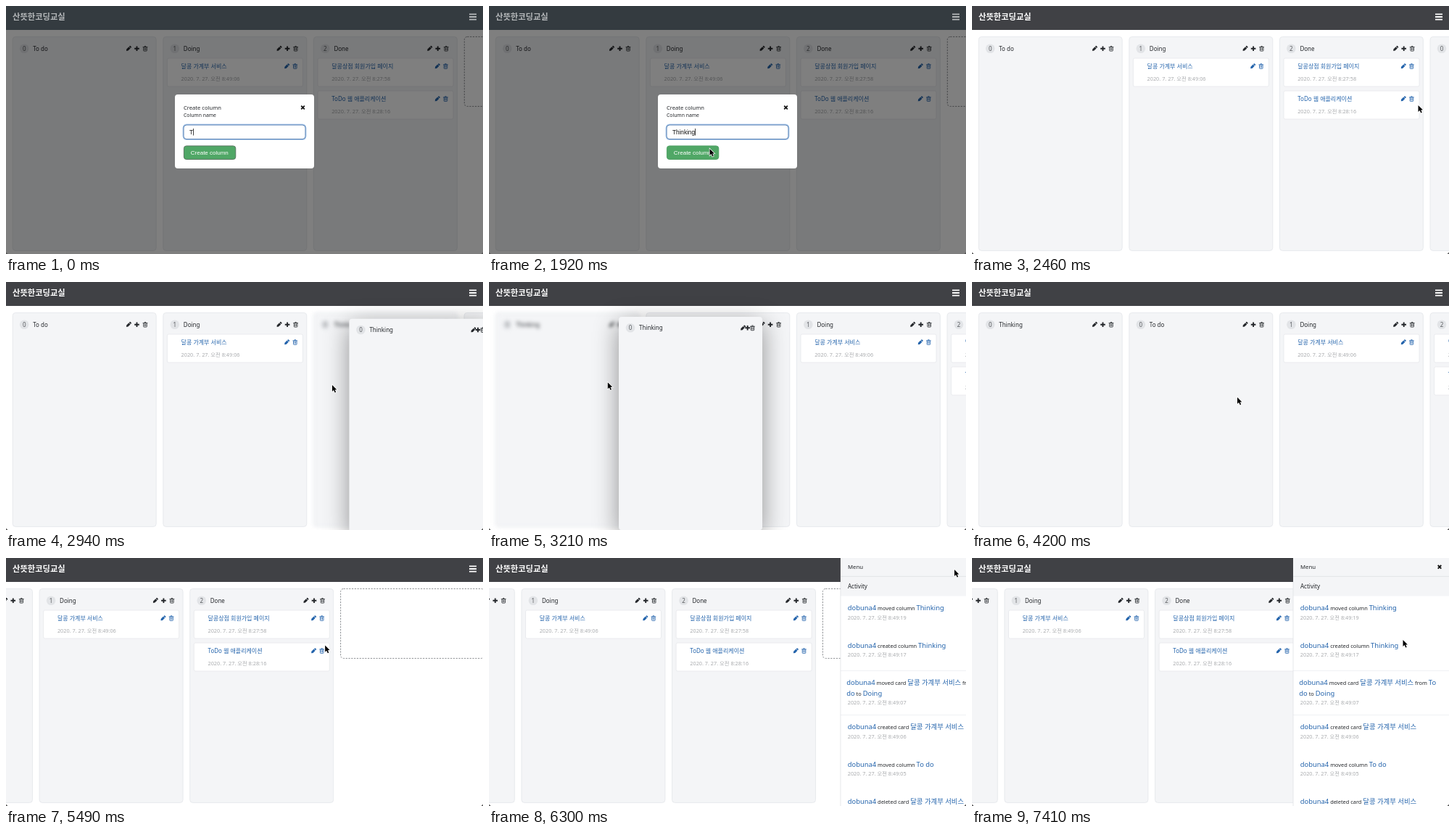
Recreate the animation shown at these times as an HTML page with a canvas. Size 658x342 px, loop 7.62 s.

```html
<!DOCTYPE html>
<html lang="ko">
<head>
<meta charset="utf-8">
<title>Board</title>
<style>
html, body { margin: 0; width: 100%; height: 100%; overflow: hidden; background: #fff; }
canvas { display: block; width: 658px; height: 342px; }
</style>
</head>
<body>
<canvas id="stage"></canvas>
<script>
const W = 658, H = 342, LOOP = 7620;
const PITCH = 207.6, LEFT = 9.2, TOP = 42, COL_W = 198, COL_H = 295;
const SANS = '"Noto Sans", "Noto Sans CJK KR", "Noto Sans CJK", sans-serif';
const ARIAL = '"Liberation Sans", sans-serif';
const BLUE = '#2464ac', INK = '#24272b', FAINT = '#a9abae', PANEL = '#f4f5f7';
const USER = 'dobuna4', BUDGET = '달콩 가계부 서비스';

const canvas = document.getElementById('stage');
const ctx = canvas.getContext('2d');
const dpr = window.devicePixelRatio || 1;
canvas.width = W * dpr;
canvas.height = H * dpr;

const COLUMNS = {
  todo: { name: 'To do', cards: [] },
  doing: { name: 'Doing', cards: [[BUDGET, '8:49:06']] },
  done: { name: 'Done', cards: [['달콩상점 회원가입 페이지', '8:27:58'], ['ToDo 웹 애플리케이션', '8:28:16']] },
  thinking: { name: 'Thinking', cards: [] }
};

// Runs alternate between highlighted and plain text.
const ACTIVITY = [
  { y: 69, lines: [[USER, ' moved column ', 'Thinking']], time: '8:49:19' },
  { y: 120.5, lines: [[USER, ' created column ', 'Thinking']], time: '8:49:17' },
  { y: 172, dx: -1.5, lines: [[USER, ' moved card ', BUDGET, ' from ', 'To'], ['do', ' to ', 'Doing']], time: '8:49:07' },
  { y: 233, lines: [[USER, ' created card ', BUDGET]], time: '8:49:06' },
  { y: 284.5, lines: [[USER, ' moved column ', 'To do']], time: '8:49:05' },
  { y: 336, lines: [[USER, ' deleted card ', BUDGET]], time: '8:49:03' }
];

const KEY_TIMES = [0, 60, 120, 180, 330, 390, 480, 570];
const POINTER_SHOWN = 660, MODAL_CLOSE = 1950, COLUMN_ADDED = 1980;
const DRAG_START = 2700, DRAG_END = 3690, DRAG_LAG = 26;
const SCROLL_START = 4710, SCROLL_TIME = 840, SCROLL_MAX = 379.5;
const MENU_OPEN = 6100, MENU_TIME = 400, MENU_W = 215;

// time, x, y of the pointer tip
const POINTER = [
  [660, 596, 150], [1020, 420, 184], [1350, 420, 184], [1860, 304.5, 197], [2130, 304.5, 197],
  [2520, 636, 133], [2670, 636, 133], [2800, 588, 139], [2940, 451, 142], [3080, 290, 141],
  [3210, 164.5, 138.5], [3330, 98, 134], [3480, 73, 133], [3870, 73, 133], [4200, 366, 159],
  [5280, 366, 159], [5900, 642, 16], [6420, 642, 16], [7020, 600, 101], [7410, 594.5, 113]
];

const clamp = v => Math.max(0, Math.min(1, v));

// cubic-bezier(x1, y1, x2, y2)
function bezier(p, x1, y1, x2, y2) {
  const at = (s, a, b) => 3 * a * s * (1 - s) ** 2 + 3 * b * s * s * (1 - s) + s ** 3;
  let lo = 0, hi = 1;
  for (let i = 0; i < 20; i++) {
    const mid = (lo + hi) / 2;
    if (at(mid, x1, x2) < p) lo = mid; else hi = mid;
  }
  return at(lo, y1, y2);
}

// Monotone Hermite interpolation along a list of keys
function track(keys, t, axis) {
  const last = keys.length - 1;
  if (t <= keys[0][0]) return keys[0][axis];
  if (t >= keys[last][0]) return keys[last][axis];
  const i = keys.findIndex(k => k[0] > t) - 1;
  const secant = j => (keys[j + 1][axis] - keys[j][axis]) / (keys[j + 1][0] - keys[j][0]);
  const slope = j => {
    if (j === 0 || j === last) return 0;
    const a = secant(j - 1), b = secant(j);
    return a * b <= 0 ? 0 : 2 * a * b / (a + b);
  };
  const [a, b] = [keys[i], keys[i + 1]];
  const span = b[0] - a[0], s = (t - a[0]) / span;
  return a[axis] * (1 + 2 * s) * (1 - s) ** 2 + slope(i) * span * s * (1 - s) ** 2
    + b[axis] * s * s * (3 - 2 * s) + slope(i + 1) * span * s * s * (s - 1);
}

function text(str, x, y, size, color, weight = 400, family = SANS, align = 'left') {
  ctx.font = `${weight} ${size}px ${family}`;
  ctx.textAlign = align;
  ctx.fillStyle = color;
  ctx.fillText(str, x, y + size * 0.36);
  return ctx.measureText(str).width;
}

function box(x, y, w, h, r, fill, stroke, line = 1) {
  ctx.beginPath();
  ctx.roundRect(x, y, w, h, r);
  if (fill) { ctx.fillStyle = fill; ctx.fill(); }
  if (stroke) { ctx.strokeStyle = stroke; ctx.lineWidth = line; ctx.stroke(); }
}

function shape(points, fill) {
  ctx.beginPath();
  points.forEach(([x, y]) => ctx.lineTo(x, y));
  ctx.closePath();
  ctx.fillStyle = fill;
  ctx.fill();
}

function lines(segments, color, width) {
  ctx.beginPath();
  for (const [x1, y1, x2, y2] of segments) { ctx.moveTo(x1, y1); ctx.lineTo(x2, y2); }
  ctx.strokeStyle = color;
  ctx.lineWidth = width;
  ctx.stroke();
}

function pencil(x, y, color) {
  ctx.save();
  ctx.translate(x, y);
  ctx.rotate(-Math.PI / 4);
  shape([[-4.6, 0], [-2.6, -1.5], [1.9, -1.5], [1.9, 1.5], [-2.6, 1.5]], color);
  box(2.4, -1.5, 1.9, 3, 0.7, color);
  ctx.restore();
}

function plus(x, y) {
  lines([[x - 3.3, y, x + 3.3, y], [x, y - 3.3, x, y + 3.3]], INK, 1.9);
}

function trash(x, y, color) {
  box(x - 2.3, y - 2, 4.6, 5.4, 0.7, null, color, 0.8);
  lines([[x - 3.4, y - 2.1, x + 3.4, y - 2.1], [x - 1.1, y - 3.3, x + 1.1, y - 3.3],
    [x - 0.8, y - 0.8, x - 0.8, y + 2.2], [x + 0.8, y - 0.8, x + 0.8, y + 2.2]], color, 0.8);
}

function cross(x, y) {
  lines([[x - 2.3, y - 2.3, x + 2.3, y + 2.3], [x - 2.3, y + 2.3, x + 2.3, y - 2.3]], '#111', 1.8);
}

function card(x, y, [title, time]) {
  box(x, y, 187, 39, 2, '#fff', '#e6e8eb', 0.8);
  text(title, x + 19.2, y + 11, 8, BLUE, 500);
  pencil(x + 165, y + 11, BLUE);
  trash(x + 176.4, y + 11, BLUE);
  text(`2020. 7. 27. 오전 ${time}`, x + 19.2, y + 28, 7.3, FAINT);
}

function columnHead(x, y, { name, cards }, icons) {
  ctx.beginPath();
  ctx.arc(x + 16, y, 6.3, 0, 7);
  ctx.fillStyle = '#e2e4e7';
  ctx.fill();
  text(String(cards.length), x + 16, y, 8, '#5a5d61', 400, SANS, 'center');
  text(name, x + 28, y, 8, INK);
  pencil(x + icons[0], y, INK);
  plus(x + icons[1], y);
  trash(x + icons[2], y, INK);
}

function column(x, col) {
  box(x, TOP + 0.4, COL_W, COL_H, 4, PANEL, '#e4e6ea', 0.8);
  columnHead(x, 58.7, col, [160, 171.3, 182.8]);
  col.cards.forEach((c, i) => card(x + 5.6, 72 + i * 45, c));
}

function addBox(x) {
  ctx.setLineDash([2.2, 1.6]);
  box(x + 0.3, 42.4, COL_W, 96, 4, null, '#8b8e92', 1);
  ctx.setLineDash([]);
}

function draggedColumn(x, y) {
  ctx.save();
  ctx.shadowColor = 'rgba(0,0,0,.42)';
  ctx.shadowBlur = 34 * dpr;
  ctx.shadowOffsetY = 9 * dpr;
  box(x, y, COL_W, 294, 4, PANEL);
  ctx.restore();
  columnHead(x, y + 15.2, COLUMNS.thinking, [171.3, 177.6, 184.4]);
}

function header(dim) {
  ctx.fillStyle = dim ? '#343b40' : '#404145';
  ctx.fillRect(0, 0, W, 33);
  const ink = dim ? '#b4b7b9' : '#fff';
  text('산뜻한코딩교실', 9, 15, 11.3, ink, 700);
  lines([11.4, 15, 18.6].map(y => [639, y, 649, y]), ink, 1.9);
}

function columnOrder(t) {
  const base = ['todo', 'doing', 'done'];
  if (t < COLUMN_ADDED) return base;
  const x = t < DRAG_START ? W : track(POINTER, Math.min(t, DRAG_END), 1);
  const slot = [207, 415, 622].filter(edge => x > edge).length;
  base.splice(slot, 0, 'thinking');
  return base;
}

function board(t) {
  const dragging = t >= DRAG_START && t < DRAG_END;
  const scroll = SCROLL_MAX * bezier(clamp((t - SCROLL_START) / SCROLL_TIME), 0.3, 0.1, 0.3, 1);
  const order = columnOrder(t);
  const slotX = i => LEFT + i * PITCH - scroll;
  order.forEach((key, i) => {
    ctx.save();
    if (dragging && key === 'thinking') ctx.filter = `blur(${2.4 * dpr}px)`;
    column(slotX(i), COLUMNS[key]);
    ctx.restore();
  });
  addBox(slotX(order.length));
}

function modal(t) {
  ctx.fillStyle = 'rgba(0,0,0,.5)';
  ctx.fillRect(0, 33, W, H - 33);
  box(233, 122, 192, 102, 4, '#fff');
  text('Create column', 245, 140, 7.6, INK);
  text('Column name', 245, 151, 6.8, INK);
  cross(409.5, 140);

  box(245, 164, 168, 19.6, 4, '#fff', 'rgba(90,150,220,.4)', 3);
  box(245, 164, 168, 19.6, 4, '#fff', '#4a78b0', 1);
  const typed = 'Thinking'.slice(0, KEY_TIMES.filter(k => k <= t).length);
  const w = text(typed, 253, 173.7, 8.2, '#111', 400, ARIAL);
  ctx.fillStyle = '#111';
  ctx.fillRect(253 + w + 0.2, 169, 0.8, 9.5);

  const hover = t >= POINTER_SHOWN && track(POINTER, t, 1) < 317;
  box(245.4, 192.9, 71.4, 18.6, 3.5, '#50a766', hover ? '#4a9d60' : '#55705c', 0.9);
  text('Create column', 254.8, 202, 8, '#fff', 400, ARIAL);
}

function menu(t) {
  if (t < MENU_OPEN) return;
  const x = W - MENU_W * bezier(clamp((t - MENU_OPEN) / MENU_TIME), 0.25, 0.1, 0.25, 1);
  ctx.fillStyle = '#fff';
  ctx.fillRect(x, 0, MENU_W, H);
  ctx.fillStyle = PANEL;
  ctx.fillRect(x, 0, MENU_W, 52.5);
  lines([[x, 25.4, x + MENU_W, 25.4]], '#e0e2e6', 0.9);
  lines([[x, 155.5, x + MENU_W, 155.5], [x, 216.5, x + MENU_W, 216.5]], '#eceef1', 0.8);
  lines([[x, 33, x, H]], '#e0e2e6', 0.8);
  text('Menu', x + 10, 12, 7.8, INK);
  cross(x + 202, 12.3);
  text('Activity', x + 10, 39, 8, INK);

  for (const item of ACTIVITY) {
    item.lines.forEach((runs, row) => {
      let px = x + 9.8 + (item.dx || 0);
      runs.forEach((run, i) => {
        const y = item.y + row * 15;
        px += i % 2 ? text(run, px, y + 0.6, 7.4, INK) : text(run, px, y, 9.4, BLUE, 500);
      });
    });
    text(`2020. 7. 27. 오전 ${item.time}`, x + 9.8, item.y + item.lines.length * 14 - 1, 7.3, FAINT);
  }
}

function pointer(t) {
  if (t < POINTER_SHOWN) return;
  ctx.save();
  ctx.translate(track(POINTER, t, 1), track(POINTER, t, 2));
  ctx.beginPath();
  [[0, 0], [0, 9], [2.1, 7.1], [3.7, 10.6], [5.2, 9.9], [3.7, 6.6], [6.4, 6.4]].forEach(p => ctx.lineTo(...p));
  ctx.closePath();
  ctx.strokeStyle = '#fff';
  ctx.lineWidth = 1.4;
  ctx.stroke();
  ctx.fillStyle = '#000';
  ctx.fill();
  ctx.restore();
}

function draw(t) {
  ctx.setTransform(dpr, 0, 0, dpr, 0, 0);
  ctx.fillStyle = '#fff';
  ctx.fillRect(0, 0, W, H);
  const open = t < MODAL_CLOSE;
  board(t);
  if (open) modal(t);
  header(open);
  if (t >= DRAG_START && t < DRAG_END) {
    const late = Math.max(DRAG_START, t) - DRAG_LAG;
    draggedColumn(track(POINTER, late, 1) - 5, track(POINTER, late, 2) - 91);
  }
  menu(t);
  pointer(t);
  shape([[0, H - 2.5], [2.5, H], [0, H]], '#555');
  shape([[W, H - 2.5], [W - 2.5, H], [W, H]], '#555');
}

const start = performance.now();
function tick() {
  draw((performance.now() - start) % LOOP);
  requestAnimationFrame(tick);
}
tick();
</script>
</body>
</html>
```
